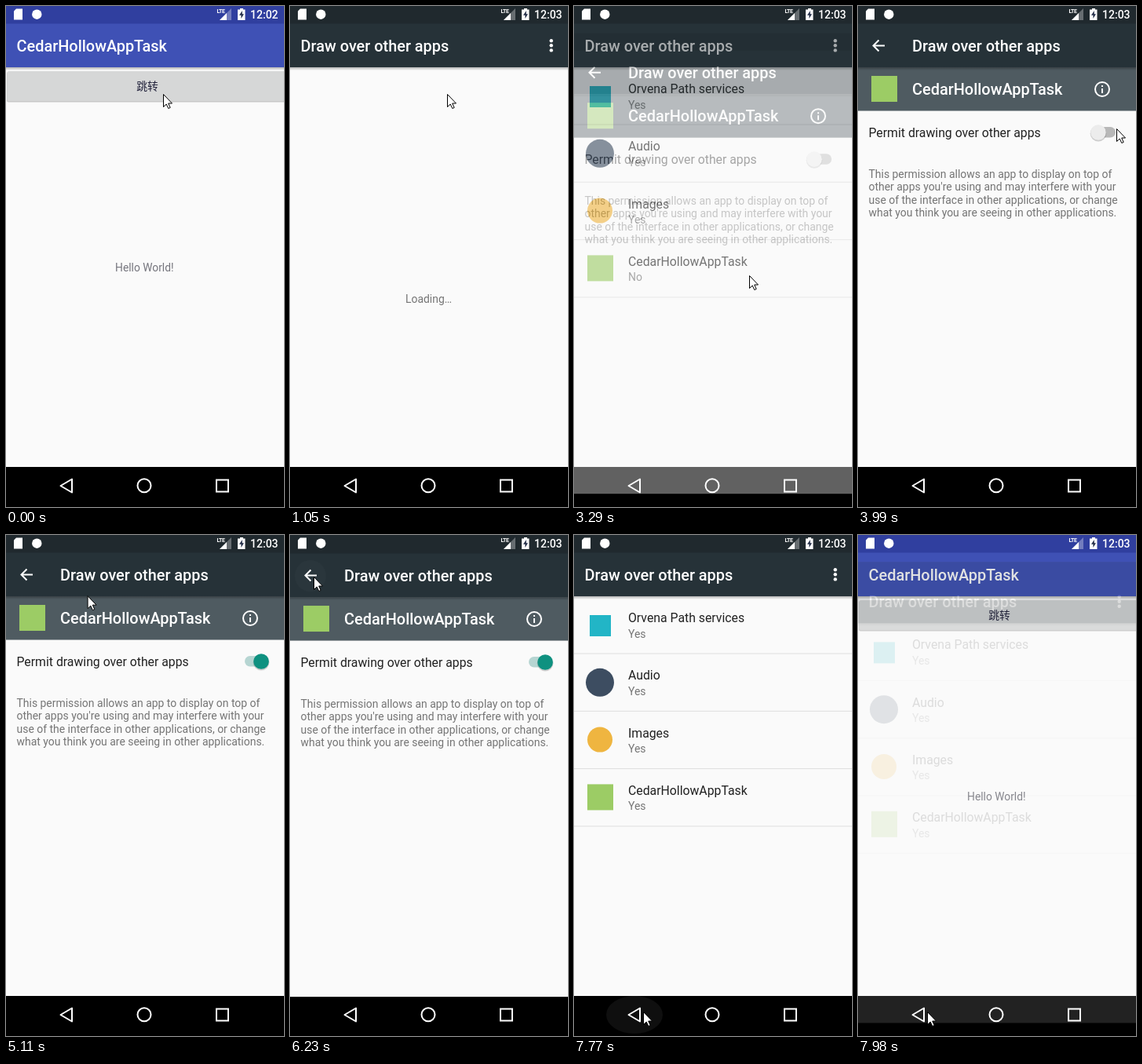
Write an HTML page that moves like this. It is 354 px wide and 638 px high and loops after 8000 ms.

```html
<!DOCTYPE html>
<html lang="en">
<head>
<meta charset="utf-8">
<title>Overlay permission walkthrough</title>
<style>
  html, body { margin: 0; width: 100%; height: 100%; overflow: hidden; background: #000; }
  svg { display: block; width: 100%; height: 100%; }
  text { font-family: Roboto, sans-serif; }
  .title { font-size: 19.9px; font-weight: 500; fill: #fff; }
  .item { font-size: 15.8px; fill: #212121; }
  .note { font-size: 13.95px; fill: #757575; }
  .mid { text-anchor: middle; }
  .line { fill: none; stroke: #fff; stroke-width: 2; }
</style>
</head>
<body>
<svg viewBox="0 0 354 638">
  <defs>
    <linearGradient id="shade" x2="0" y2="1">
      <stop offset="0" stop-color="#000" stop-opacity=".28"/>
      <stop offset="1" stop-color="#000" stop-opacity="0"/>
    </linearGradient>
    <g id="page">
      <rect width="354" height="638"/>
      <rect width="354" height="587" fill="#fafafa"/>
    </g>
    <g id="darkBar">
      <rect width="354" height="78" fill="#263238"/>
      <rect width="354" height="22.5" fill="#20292e"/>
    </g>
    <rect id="barShadow" y="78" width="354" height="4" fill="url(#shade)"/>
  </defs>

  <g id="home">
    <use href="#page"/>
    <rect width="354" height="78" fill="#3f51b5"/>
    <rect width="354" height="22.5" fill="#303f9f"/>
    <use href="#barShadow"/>
    <text class="title" x="13.5" y="58">CedarHollowAppTask</text>
    <rect x="1" y="84" width="356" height="38.5" rx="2" fill="#000" opacity=".2"/>
    <rect x="1.5" y="83" width="356" height="38" rx="2" fill="#d6d7d7"/>
    <text class="mid" x="180" y="107" style="font:13.8px 'Noto Sans CJK SC','Noto Sans CJK',sans-serif" fill="#20203a">跳转</text>
    <text class="mid" x="176.3" y="338" font-size="13.8" fill="#75757d">Hello World!</text>
  </g>

  <g id="list">
    <use href="#page"/>
    <use href="#darkBar"/>
    <use href="#barShadow"/>
    <text class="title" x="13.5" y="58">Draw over other apps</text>
    <g fill="#fff">
      <circle cx="332.7" cy="44.2" r="2.2"/><circle cx="332.7" cy="50.3" r="2.2"/><circle cx="332.7" cy="56.4" r="2.2"/>
    </g>
    <text id="loading" class="note mid" x="176.5" y="378">Loading…</text>
    <g id="rows"></g>
  </g>

  <g id="detail">
    <use href="#page"/>
    <rect y="78" width="354" height="55.5" fill="#4f5b61"/>
    <use href="#darkBar"/>
    <use href="#barShadow"/>
    <circle id="arrowRipple" fill="#fff" opacity=".02"/>
    <path class="line" d="M34 50.5H20M26.5 43.5L19.5 50.5L26.5 57.5"/>
    <text class="title" x="69" y="58">Draw over other apps</text>
    <rect x="17" y="89" width="33" height="33" fill="#9ccc65"/>
    <text class="title" x="69" y="113">CedarHollowAppTask</text>
    <circle class="line" cx="311" cy="106" r="9"/>
    <path class="line" d="M311 105v6M311 101v2"/>
    <text class="item" x="13.5" y="167">Permit drawing over other apps</text>
    <rect id="track" x="304" y="154" width="24" height="13.5" rx="6.7"/>
    <g id="thumb">
      <circle cy="162.2" r="10.3" opacity=".18"/>
      <circle id="knob" cy="161" r="9.8"/>
    </g>
    <g class="note">
      <text x="13.5" y="219">This permission allows an app to display on top of</text>
      <text x="13.5" y="235.3">other apps you're using and may interfere with your</text>
      <text x="13.5" y="251.6">use of the interface in other applications, or change</text>
      <text x="13.5" y="267.9">what you think you are seeing in other applications.</text>
    </g>
  </g>

  <g id="system">
    <path d="M13 3.5H21V17.5H10V6.5Z" fill="#fff"/>
    <circle cx="39.3" cy="10.7" r="6.2" fill="#fff"/>
    <text x="268.5" y="9.3" font-size="7" font-weight="700" letter-spacing="-.5" fill="#fff">LTE</text>
    <path d="M272 18L287 3V18Z" fill="#fff" opacity=".32"/>
    <path d="M272 18L281 9V18Z" fill="#fff"/>
    <path d="M295 4.5H298V3H302V4.5H304.5V18H295Z" fill="#fff"/>
    <path d="M300.8 6L297 11.7H299.4V16L303 10.2H300.8Z" fill="#26304a"/>
    <text id="clock" x="311" y="16" font-size="14" font-weight="500" fill="#fff"></text>
    <ellipse id="navRipple" cx="77" cy="611" rx="36" ry="24" fill="#fff"/>
    <path class="line" stroke-linejoin="round" d="M69.5 611L84 602.5V619.5Z"/>
    <circle class="line" cx="176" cy="610.7" r="8.5"/>
    <rect class="line" x="268" y="603.5" width="15" height="15"/>
  </g>

  <path id="cursor" d="M.5 .5V16.5L4.2 13L6.8 18.5L9.2 17.4L6.7 12H11.5Z" fill="#fff" stroke="#000"/>
</svg>
<script>
const LOOP = 8000, STEP = 70, RISE = 48;
const el = id => document.getElementById(id);
const clamp = x => Math.min(1, Math.max(0, x));
const mix = (a, b, p) => a + (b - a) * p;
const smooth = p => p * p * (3 - 2 * p);
const set = (id, attrs) => {
  for (const name in attrs) el(id).setAttribute(name, attrs[name]);
};

const apps = [
  ['Orvena Path services', '<rect x="20" y="102" width="27" height="27" fill="#22b5c6"/>'],
  ['Audio', '<circle cx="33" cy="114.5" r="18" fill="#3d4d61"/>'],
  ['Images', '<circle cx="33" cy="114" r="16" fill="#efb540"/>'],
  ['CedarHollowAppTask', '<rect x="17" y="97.5" width="33" height="33" fill="#9ccc65"/>']
];
el('rows').innerHTML = apps.map(([name, icon], i) => `
  <g transform="translate(0 ${i * 73.3})">${icon}
    <text class="item" x="69" y="111">${name}</text>
    <text class="note" x="69" y="130.5" id="state${i}">Yes</text>
    <rect y="150.5" width="354" height="1" fill="#dedede"/>
  </g>`).join('');

// Pointer stops: time, x, y
const stops = [
  [0, 200, 112], [1470, 200, 112], [1750, 222, 300], [1890, 231, 404], [2030, 230, 356],
  [2100, 223, 343], [3430, 223, 343], [3990, 329, 156], [4690, 329, 156], [5180, 66, 64],
  [5460, 30, 53], [6510, 30, 53], [6650, 70, 290], [6790, 121, 545], [6930, 87, 621],
  [7000, 87, 621], [7280, 88, 607], [LOOP, 88, 607]
];
function pointer(t) {
  const i = stops.findIndex(s => s[0] > t);
  const [t0, x0, y0] = stops[i - 1], [t1, x1, y1] = stops[i];
  const p = (t - t0) / (t1 - t0);
  return [mix(x0, x1, p), mix(y0, y1, p)];
}

// A window rises while fading in, later sinks while fading out.
// "lead" is how far the transition has run when it first becomes visible.
function moveWindow(id, t, [openAt, openLead], [closeAt, closeLead]) {
  let y, opacity;
  if (t < closeAt) {
    const age = t - openAt + openLead;
    y = RISE * (1 - clamp(age / 350)) ** 5;
    opacity = t < openAt ? 0 : 1 - (1 - clamp(age / 200)) ** 4;
  } else {
    const age = t - closeAt + closeLead;
    y = RISE * clamp(age / 250) ** 4;
    opacity = 1 - clamp((age - 100) / 150);
  }
  set(id, { transform: `translate(0 ${y})`, opacity, display: opacity ? 'inline' : 'none' });
}

function draw(t) {
  moveWindow('list', t, [770, 94], [7770, 20]);
  moveWindow('detail', t, [3290, 23], [6230, 96]);

  const loaded = clamp((t - 1190) / 220);
  set('loading', { opacity: 1 - loaded });
  set('rows', { opacity: loaded });
  el('state3').textContent = t < 6440 ? 'No' : 'Yes';
  el('clock').textContent = t < 770 ? '12:02' : '12:03';

  const on = smooth(clamp((t - 4340) / 250));
  set('thumb', { transform: `translate(${mix(306, 325, on)} 0)` });
  set('knob', { fill: `rgb(${mix(236, 15, on)} ${mix(236, 145, on)} ${mix(236, 128, on)})` });
  set('track', { fill: `rgb(${mix(184, 182, on)} ${mix(184, 213, on)} ${mix(184, 210, on)})` });

  const wide = t >= 6230;
  set('arrowRipple', { cx: wide ? 26 : 29, cy: wide ? 51 : 56, r: t < 5950 ? 0 : wide ? 20 : 11 });
  set('navRipple', { opacity: .18 * clamp((t - 7350) / 140) * clamp((7840 - t) / 210) });

  set('cursor', { transform: `translate(${pointer(t)})` });
}

function tick() {
  const t = performance.now() % LOOP;
  draw(Math.floor(t / STEP) * STEP);
  requestAnimationFrame(tick);
}
tick();
</script>
</body>
</html>
```
